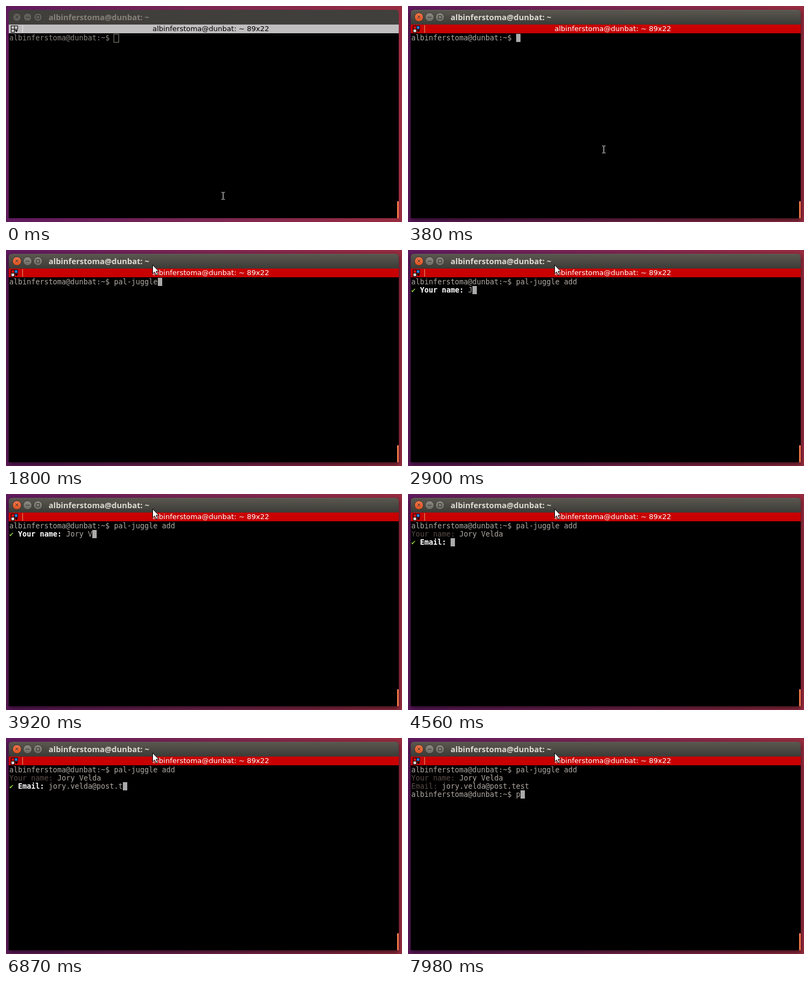
Recreate the animation shown at these times as an HTML page. Size 725 px wide and 396 px high, loop 8 s.

```html
<!DOCTYPE html>
<html lang="en">
<head>
<meta charset="utf-8">
<title>Terminal session</title>
<style>
  html, body { margin: 0; width: 100%; height: 100%; overflow: hidden; background: #5e1a5a; }
  svg { display: block; width: 725px; height: 396px; }
  text { white-space: pre; }
  .row { font: 13.288px "DejaVu Sans Mono", monospace; fill: #b0aaa4; }
  .check { fill: #86bd3c; }
  .active { fill: #fff; font-weight: bold; }
  .done { fill: #5b4c48; }
  .title { font: bold 14.5px "Open Sans", "Noto Sans", sans-serif; fill: #dfdbd2; }
  .bar { font: 13px "DejaVu Sans", sans-serif; fill: #fff; text-anchor: middle; }
  .off, .idle .on { display: none; }
  .idle .off { display: inline; }
  .idle .title { fill: #85827b; }
  .idle .bar { fill: #000; }
  .idle .row { fill: #8b8681; }
</style>
</head>
<body>
<svg id="stage" class="idle" viewBox="0 0 725 396">
  <defs>
    <linearGradient id="wall">
      <stop offset="0" stop-color="#5f1a5e"/>
      <stop offset=".5" stop-color="#7b2652"/>
      <stop offset="1" stop-color="#982c40"/>
    </linearGradient>
    <filter id="blur" x="-10%" y="-10%" width="120%" height="120%">
      <feGaussianBlur stdDeviation="5"/>
    </filter>
    <linearGradient id="frame" x2="0" y2="1">
      <stop offset="0" stop-color="#5a5850"/>
      <stop offset="1" stop-color="#3c3b37"/>
    </linearGradient>
    <linearGradient id="orange" x2="0" y2="1">
      <stop offset="0" stop-color="#f4794e"/>
      <stop offset="1" stop-color="#d9501f"/>
    </linearGradient>
    <linearGradient id="grey" x2="0" y2="1">
      <stop offset="0" stop-color="#8d8b82"/>
      <stop offset="1" stop-color="#6b6a63"/>
    </linearGradient>
    <path id="titlebar" d="M5 34V13q0-6 6-6H713q6 0 6 6V34z"/>
    <g id="signs" fill="none">
      <path d="M17.5 17.5l5 5m0-5l-5 5M36 20.5h7M55.5 17.5h6v6h-6z"/>
    </g>
  </defs>

  <rect width="725" height="396" fill="url(#wall)"/>
  <rect class="on" x="5" y="11" width="714" height="382" opacity=".6" filter="url(#blur)"/>

  <rect x="5" y="34" width="714" height="355"/>
  <use class="on" href="#titlebar" fill="url(#frame)"/>
  <use class="off" href="#titlebar" fill="#403f3b"/>
  <path class="on" d="M11 7.5H713" stroke="#605e55"/>

  <g class="on" stroke="#33322e">
    <circle cx="20" cy="20.5" r="8" fill="url(#orange)"/>
    <circle cx="39.5" cy="20.5" r="8" fill="url(#grey)"/>
    <circle cx="58.5" cy="20.5" r="8" fill="url(#grey)"/>
    <use href="#signs"/>
  </g>
  <g class="off" stroke="#33322e">
    <g fill="#605e58">
      <circle cx="20" cy="20.5" r="7.5"/>
      <circle cx="39.5" cy="20.5" r="7.5"/>
      <circle cx="58.5" cy="20.5" r="7.5"/>
    </g>
    <use href="#signs"/>
  </g>
  <text class="title" x="78" y="25.5">albinferstoma@dunbat: ~</text>

  <g class="on">
    <rect x="5" y="34" width="714" height="16" fill="#c80000"/>
    <path d="M30.5 35v14" stroke="#e9a06a"/>
    <g stroke="#000">
      <rect x="9.5" y="36.5" width="6" height="6" fill="#d01010"/>
      <rect x="15.5" y="36.5" width="6" height="6" fill="#2a78c8"/>
      <rect x="9.5" y="42.5" width="6" height="6" fill="#d8d4d0"/>
    </g>
    <path d="M16 44h6l-3 4z"/>
  </g>
  <g class="off">
    <rect x="5" y="34" width="714" height="16" fill="#c0bebf"/>
    <path d="M30.5 35v14" stroke="#eee"/>
    <path d="M9.5 36.5h12v6h-12zv12h6v-12" fill="none" stroke="#000"/>
    <path d="M16 44h6l-3 4z"/>
  </g>
  <text class="bar" x="375" y="46">albinferstoma@dunbat: ~ 89x22</text>

  <rect x="716" y="358" width="3" height="31" fill="#f07746"/>
  <rect id="caret" class="on" width="8" height="15" fill="#aaa"/>
  <rect class="off" x="197.5" y="51.5" width="9" height="15" fill="none" stroke="#8b8681"/>
  <g id="rows"></g>

  <path id="beam" d="M-3 -6.5h2.5M.5 -6.5h2.5M0 -6V6M-3 6.5h2.5M.5 6.5h2.5" fill="none" stroke="#e8e8e8" stroke-width="1.2"/>
  <path id="arrow" d="M.5 .5V16.5L4.2 13L6.8 19L9.4 17.9L6.9 12H11.5z" fill="#fff" stroke="#000"/>
</svg>
<script>
  const LOOP = 8000, FOCUS = 380, CELL = 8, LINE = 15, LEFT = 6, TOP = 51;
  const PROMPT = 'albinferstoma@dunbat:~$ ';
  const ENTERS = [2440, 4560, 7500];
  const BLINKS = [[770, 900], [7740, 7980]];
  const $ = id => document.getElementById(id);

  // Typing bursts: first key, last key, number of keys
  const command = { text: 'pal-juggle add', bursts: [[900, 1120, 3], [1220, 1220, 1], [1360, 1600, 4], [1740, 1800, 2], [2000, 2220, 4]] };
  const person = { text: 'Jory Velda', bursts: [[2900, 3140, 4], [3740, 3740, 1], [3920, 4130, 3], [4270, 4350, 2]] };
  const email = { text: 'jory.velda@post.test', bursts: [[4960, 5180, 4], [5620, 5960, 5], [6010, 6010, 1], [6220, 6220, 1], [6480, 7010, 9]] };
  const again = { text: 'p', bursts: [[7980, 7980, 1]] };

  function typed({ text, bursts }, t) {
    let count = 0;
    for (const [from, to, keys] of bursts) {
      if (t < from) break;
      count += to > from ? Math.min(keys, 1 + Math.floor((t - from) / (to - from) * (keys - 1))) : keys;
    }
    return text.slice(0, count);
  }

  function add(tag, parent) {
    return parent.appendChild(document.createElementNS('http://www.w3.org/2000/svg', tag));
  }

  const rows = Array.from({ length: 4 }, (_, i) => {
    const line = add('text', $('rows'));
    line.setAttribute('class', 'row');
    line.setAttribute('y', TOP + 12 + i * LINE);
    const [check, label, body] = [0, 1, 2].map(() => add('tspan', line));
    check.setAttribute('class', 'check');
    return { check, label, body };
  });

  function put(span, text, col) {
    span.setAttribute('x', LEFT + col * CELL);
    if (span.textContent !== text) span.textContent = text;
  }

  // Fills one row and returns the column after its last character
  function fill(i, body, label = '', active = false) {
    const { check, label: tag, body: rest } = rows[i];
    const start = active ? 2 : 0;
    put(check, active ? '✔' : '', 0);
    put(tag, label, start);
    tag.setAttribute('class', active ? 'active' : 'done');
    put(rest, body, start + label.length);
    return start + label.length + body.length;
  }

  function show(id, visible) {
    $(id).setAttribute('visibility', visible ? 'visible' : 'hidden');
  }

  function drawText(t) {
    const cols = [
      fill(0, PROMPT + typed(command, t)),
      t < 2490 ? fill(1, '') : fill(1, typed(person, t), 'Your name: ', t < ENTERS[1]),
      t < ENTERS[1] ? fill(2, '') : fill(2, typed(email, t), 'Email: ', t < ENTERS[2]),
      t < ENTERS[2] ? fill(3, '') : fill(3, PROMPT + typed(again, t))
    ];
    const row = ENTERS.filter(enter => t >= enter).length;
    $('caret').setAttribute('x', LEFT + cols[row] * CELL);
    $('caret').setAttribute('y', TOP + row * LINE);
    show('caret', !BLINKS.some(([from, to]) => t >= from && t < to));
  }

  const progress = (t, from, to) => Math.min(1, Math.max(0, (t - from) / (to - from)));

  // The pointer stops to click into the window, then leaves for the title bar
  function drawPointer(t) {
    const a = progress(t, 0, 200);
    const b = 1 - (1 - progress(t, FOCUS, 660)) ** 1.6;
    const x = Math.round(397 - 39 * a - 90 * b);
    const y = Math.round(348 - 85 * a - 236 * b);
    $('beam').setAttribute('transform', `translate(${x + 0.5} ${y})`);
    $('arrow').setAttribute('transform', `translate(${x} ${y})`);
    show('beam', y > 50);
    show('arrow', y <= 50);
  }

  function frame() {
    const t = performance.now() % LOOP;
    $('stage').setAttribute('class', t < FOCUS ? 'idle' : '');
    drawText(t);
    drawPointer(Math.floor(t / 20) * 20);
    requestAnimationFrame(frame);
  }
  frame();
</script>
</body>
</html>
```
